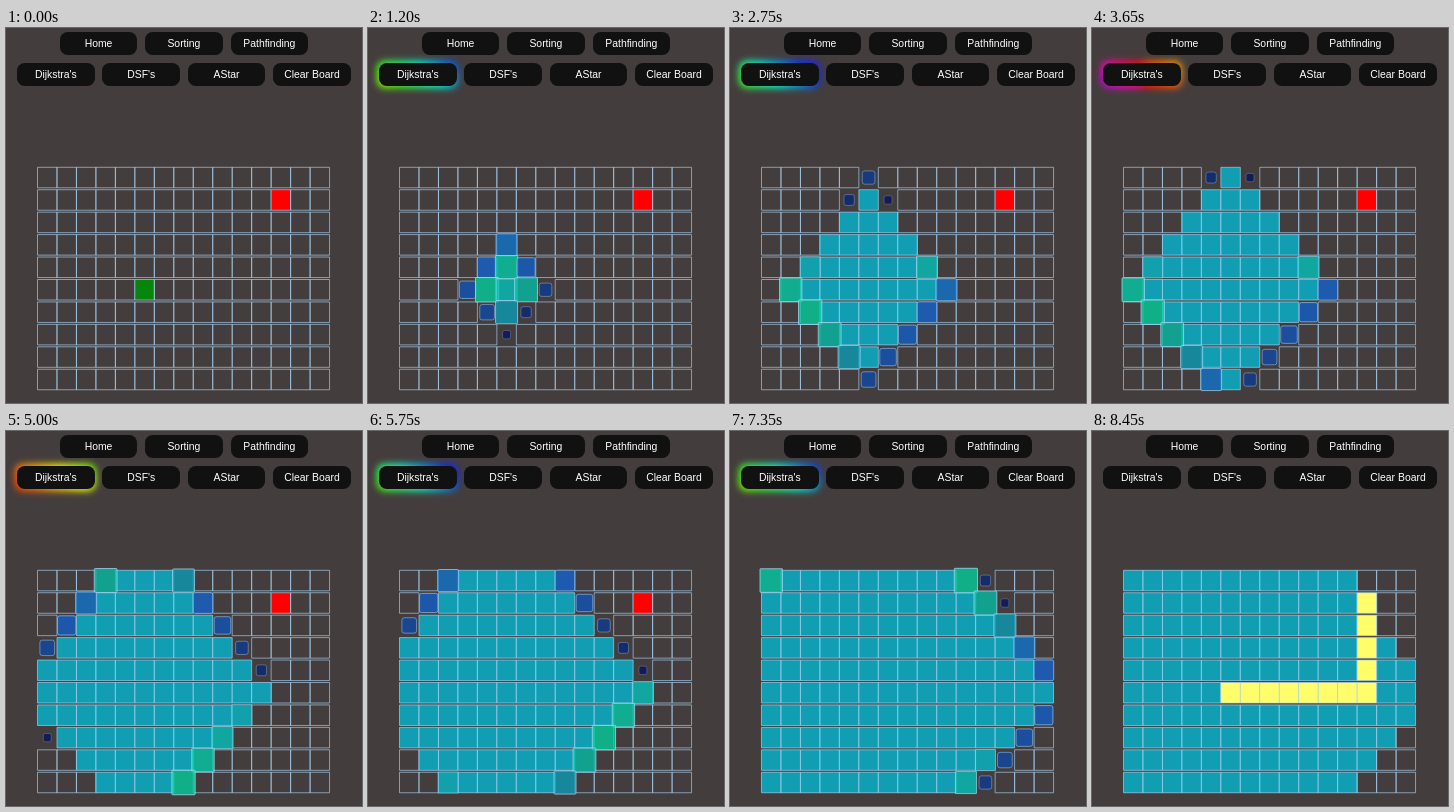
Recreate the animation shown at these times as an HTML page with a canvas. Size 356 by 375 pixels, loop 8950 ms.

```html
<!DOCTYPE html>
<html lang="en">
<head>
<meta charset="utf-8">
<style>
  html, body { margin: 0; width: 100%; height: 100%; overflow: hidden; background: #443d3d; }
  #stage { position: relative; width: 356px; height: 375px; overflow: hidden; }
  canvas { position: absolute; left: 0; top: 0; }
  .btn {
    position: absolute; width: 77.6px; height: 23.4px; border-radius: 7.8px;
    background: #111; color: #fff; text-align: center;
    font: 10.4px/23.4px "Liberation Sans", Arial, sans-serif;
  }
  #glow {
    position: absolute; left: 9.2px; top: 33.2px; width: 81px; height: 27px;
    border-radius: 7.8px; filter: blur(3.9px); opacity: 0;
    background: linear-gradient(45deg, #ff0000, #ff7300, #fffb00, #48ff00,
      #00ffd5, #002bff, #7a00ff, #ff00c8, #ff0000) 0 0 / 400% 100%;
  }
</style>
</head>
<body>
<div id="stage">
  <canvas width="356" height="375"></canvas>
  <div id="glow"></div>
</div>
<script>
const LOOP = 8950, STEP = 50, LAST = 8450;
const COLS = 15, ROWS = 10, X0 = 31.5, Y0 = 139.3, W = 19.47, H = 20.5, PITCH = 22.44;
const START = [5, 5], END = [12, 1];
const VISIT_AT = 560, VISIT_GAP = 50, PATH_GAP = 25, DURATION = 750;
const GLOW_TURN = 5100, GLOW_CYCLE = 1667;

const stage = document.getElementById('stage');
const glow = document.getElementById('glow');
const ctx = document.querySelector('canvas').getContext('2d');

function addButtons(labels, x, y) {
  labels.forEach((label, i) => {
    const b = document.createElement('div');
    b.className = 'btn';
    b.textContent = label;
    b.style.left = x + i * 85.4 + 'px';
    b.style.top = y + 'px';
    stage.append(b);
  });
}
addButtons(['Home', 'Sorting', 'Pathfinding'], 53.7, 3.8);
addButtons(["Dijkstra's", "DSF's", 'AStar', 'Clear Board'], 11, 34.9);

const key = (c, r) => r * COLS + c;

// Breadth-first search in the order up, left, right, down, until the end is reached
function search() {
  const queue = [START], seen = new Set([key(...START)]);
  for (let i = 0; i < queue.length; i++) {
    const [c, r] = queue[i];
    if (key(c, r) === key(...END)) return queue.slice(0, i + 1);
    for (const [dc, dr] of [[0, -1], [-1, 0], [1, 0], [0, 1]]) {
      const x = c + dc, y = r + dr;
      if (x < 0 || y < 0 || x >= COLS || y >= ROWS || seen.has(key(x, y))) continue;
      seen.add(key(x, y));
      queue.push([x, y]);
    }
  }
  return queue;
}

const visitAt = [], pathAt = [];
const order = search();
order.forEach(([c, r], i) => { visitAt[key(c, r)] = VISIT_AT + i * VISIT_GAP; });
const pathStart = VISIT_AT + order.length * VISIT_GAP;
for (let i = 0; i < 12; i++) {
  const cell = i < 8 ? [5 + i, 5] : [12, 12 - i];
  pathAt[key(...cell)] = pathStart + i * PATH_GAP;
}

const clamp = v => Math.max(0, Math.min(1, v));
const easeOut = v => 1 - (1 - clamp(v)) ** 1.7;

// Keyframes are [time, value], each segment eased on its own
function keyed(frames, p) {
  let i = 0;
  while (i < frames.length - 2 && p >= frames[i + 1][0]) i++;
  const [t0, a] = frames[i], [t1, b] = frames[i + 1];
  const k = easeOut((p - t0) / (t1 - t0));
  return a.map((v, j) => v + (b[j] - v) * k);
}

const VISIT_SCALE = [[0, [0.3]], [0.75, [1.2]], [1, [1]]];
const VISIT_COLOR = [[0, [0, 0, 66]], [0.5, [17, 104, 217]], [0.75, [0, 217, 159]], [1, [0, 190, 218]]];
const PATH_SCALE = [[0, [0.6]], [0.5, [1.2]], [1, [1]]];

function look(c, r, t) {
  const id = key(c, r);
  if (t >= pathAt[id]) {
    const p = clamp((t - pathAt[id]) / DURATION);
    return { fill: 'rgb(255,254,106)', scale: keyed(PATH_SCALE, p)[0], radius: 0, moving: p < 1 };
  }
  if (t >= visitAt[id]) {
    const p = clamp((t - visitAt[id]) / DURATION);
    const rgb = keyed(VISIT_COLOR, p).map(Math.round);
    return {
      fill: `rgba(${rgb},0.75)`, scale: keyed(VISIT_SCALE, p)[0],
      radius: 5 * (1 - easeOut(p)), moving: p < 1
    };
  }
  const fill = id === key(...START) ? '#06840c' : id === key(...END) ? '#f00' : null;
  return { fill, scale: 1, radius: 0, moving: false };
}

function drawCell(c, r, { fill, scale, radius }) {
  ctx.save();
  ctx.translate(X0 + (c + 0.5) * W, Y0 + r * PITCH + H / 2);
  ctx.scale(scale, scale);
  ctx.beginPath();
  ctx.roundRect(-W / 2, -H / 2, W, H, radius);
  if (fill) {
    ctx.fillStyle = fill;
    ctx.fill();
  }
  ctx.lineWidth = 0.78;
  ctx.strokeStyle = 'rgba(175,216,248,0.8)';
  ctx.stroke();
  ctx.restore();
}

function draw(t) {
  ctx.clearRect(0, 0, 356, 375);
  const moving = [];
  for (let r = 0; r < ROWS; r++) {
    for (let c = 0; c < COLS; c++) {
      const cell = look(c, r, t);
      if (cell.moving) moving.push([c, r, cell]);
      else drawCell(c, r, cell);
    }
  }
  moving.forEach(m => drawCell(...m));

  const shift = Math.abs(t - GLOW_TURN) / GLOW_CYCLE % 1;
  glow.style.backgroundPosition = -shift * 4 * 81 + 'px 0';
  glow.style.opacity = Math.min(clamp((t - 350) / 150), clamp((8350 - t) / 150));
  if (t < 400) glow.style.opacity = 0;
}

const begin = performance.now();
function tick() {
  const t = (performance.now() - begin) % LOOP;
  draw(Math.min(LAST, Math.floor(t / STEP) * STEP));
  requestAnimationFrame(tick);
}
tick();
</script>
</body>
</html>
```
